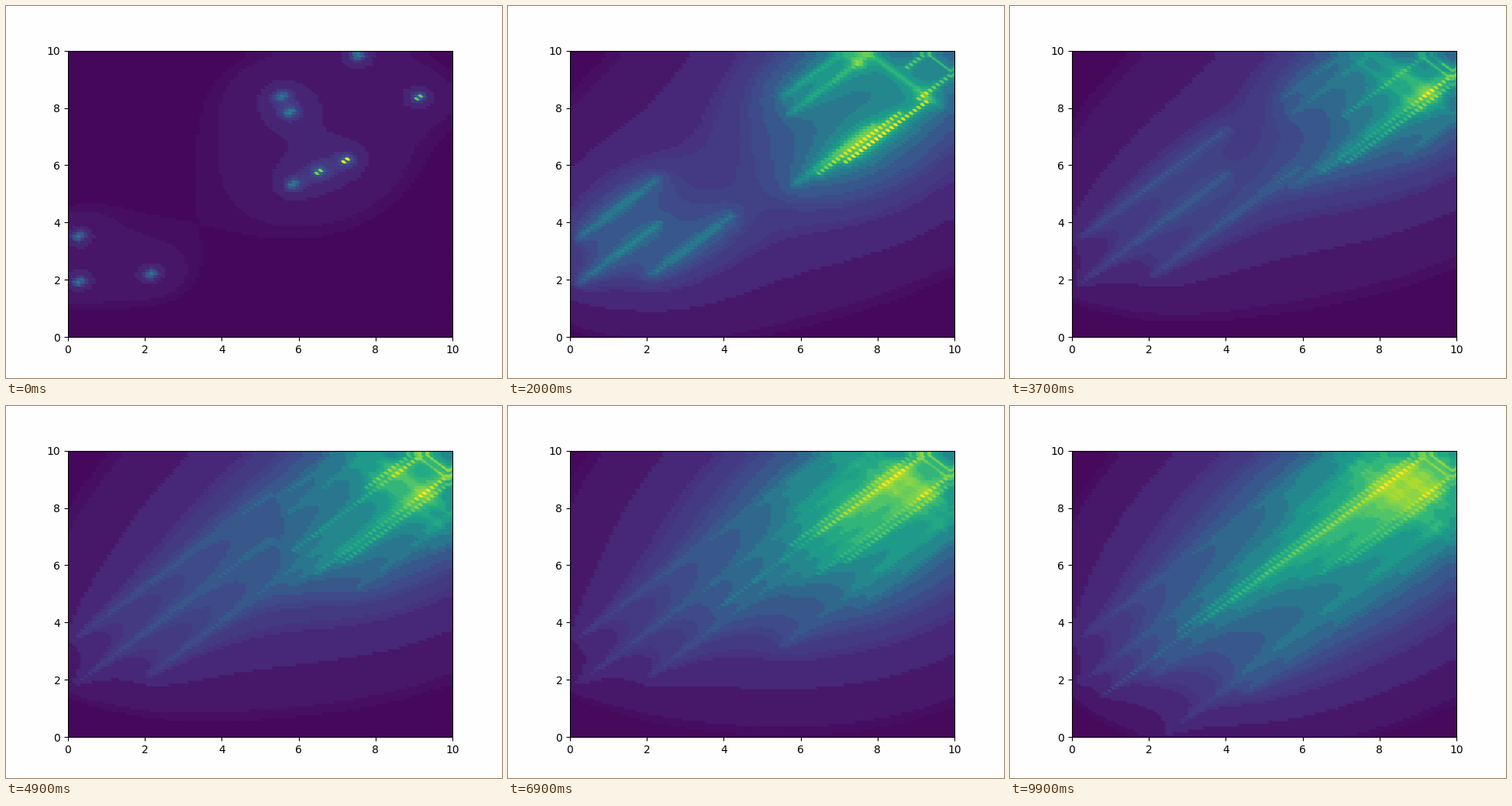
Write a matplotlib script that moves like this. It is 640 px wide and 480 px high and loops after 10 s.

```python
import numpy as np
import matplotlib.pyplot as plt
from matplotlib.animation import FuncAnimation

FRAMES, SIZE, STEP = 100, 10.0, 0.1

START = np.array([
    (0.26, 3.56), (0.26, 1.97), (2.14, 2.24), (5.54, 8.44), (5.75, 7.88),
    (5.84, 5.37), (6.514, 5.814), (7.2105, 6.2105), (9.114, 8.414), (7.54, 9.86),
])


def walk(start, steps):
    """Diagonal paths that turn round after crossing a wall."""
    pos, vel = start.copy(), np.full(start.shape, STEP)
    path = [pos.copy()]
    for _ in range(steps):
        pos += vel
        vel[(pos > SIZE) | (pos < 0)] *= -1
        path.append(pos.copy())
    return path


def potential(points, x, y):
    """Sum of 1/r over all points."""
    dx = x[:, None] - points[:, 0]
    dy = y[:, None] - points[:, 1]
    return (1 / np.sqrt(dx**2 + dy**2)).sum(axis=1)


axis = np.arange(0, SIZE, STEP)
gx, gy = (g.ravel() for g in np.meshgrid(axis, axis))
fields = np.cumsum([potential(p, gx, gy) for p in walk(START, FRAMES)], axis=0)

# Neighbouring viridis shades share one band, coloured by their mean.
shades = (plt.get_cmap("viridis")(np.arange(256))[:, :3] * 255).astype(int)
_, band = np.unique(shades >> np.array([5, 4, 5]), axis=0, return_inverse=True)
band = band.ravel()


def banded(field):
    level = (field - field.min()) / np.ptp(field)
    idx = np.minimum((level * 256).astype(int), 255)
    count = np.bincount(idx, minlength=256)
    total = np.maximum(np.bincount(band, count), 1)
    mean = np.stack([np.bincount(band, count * shades[:, c]) / total
                     for c in range(3)], axis=1)
    return mean[band[idx]] / 255


fig, ax = plt.subplots(figsize=(6.4, 4.8), dpi=100, facecolor="#fefefe")
ax.set_facecolor("#fefefe")
ax.set(xlim=(0, SIZE), ylim=(0, SIZE))
dots = ax.scatter(gx, gy, s=7.5**2, c=banded(fields[1]), linewidths=0)


def update(i):
    dots.set_facecolor(banded(fields[i + 1]))
    return (dots,)


anim = FuncAnimation(fig, update, frames=FRAMES, interval=100,
                     repeat=True, repeat_delay=0, blit=False)
plt.show()
```
